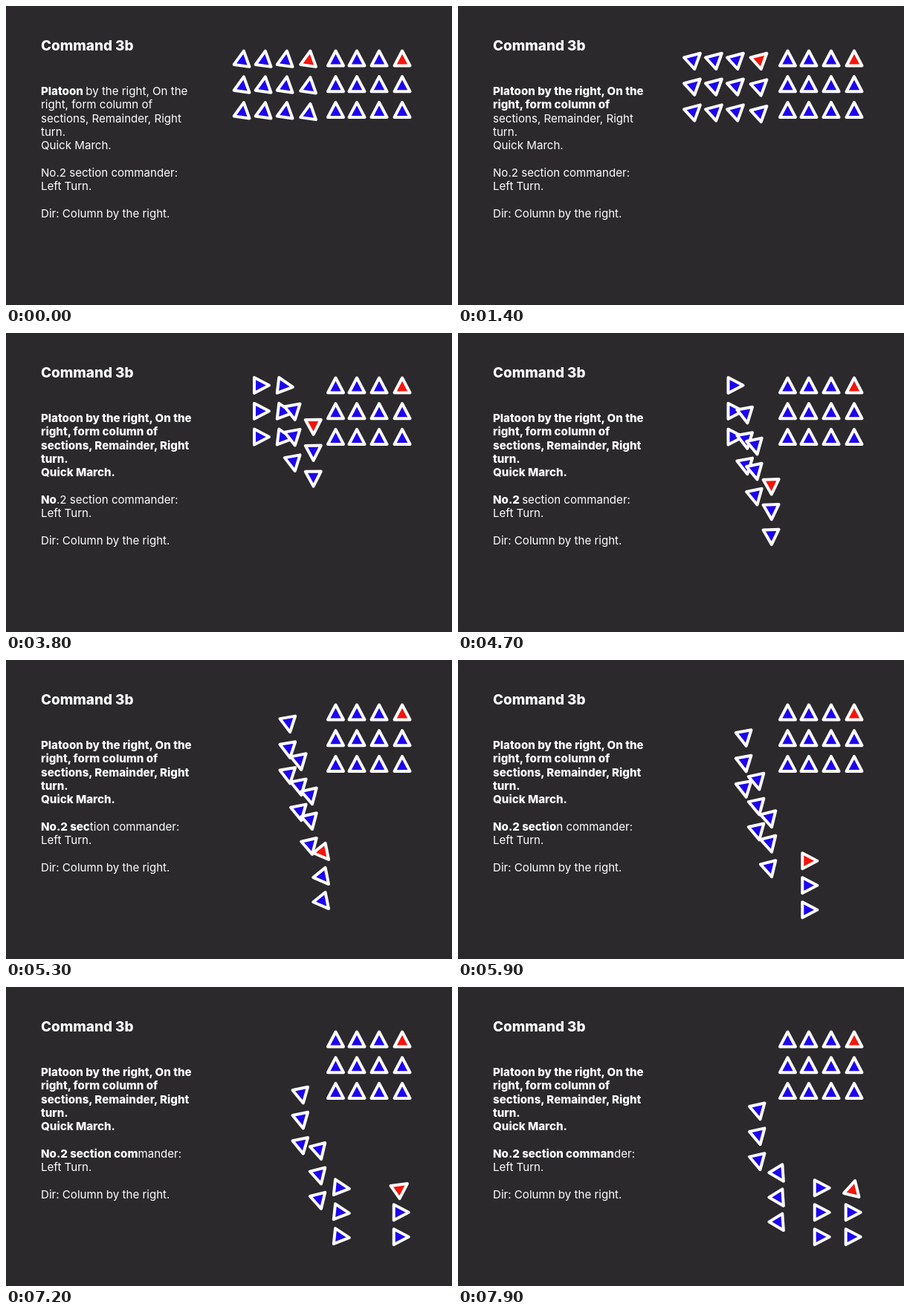
Animation of 600 by 403 pixels, one loop 8 s. Source, as an HTML page:

```html
<!DOCTYPE html>
<html lang="en">
<head>
<meta charset="utf-8">
<title>Command 3b</title>
<style>
  html, body { margin: 0; width: 100%; height: 100%; overflow: hidden; background: #2b292c; }
  svg { display: block; width: 100%; height: 100%; }
  text { font-family: Inter, sans-serif; font-size: 15.1px; fill: #fff; white-space: pre; }
  .bold { font-weight: 800; }
  .title { font-size: 18.9px; }
  path { stroke: #fff; stroke-width: 4; stroke-linejoin: round; }
</style>
</head>
<body>
<svg id="stage" viewBox="0 0 600 403">
  <text class="bold title" x="47" y="59.8">Command 3b</text>
</svg>
<script>
const LOOP = 8000, STEP = 100;
const BLUE = '#1c05ee', RED = '#f4150b';
const TOP = 70.5, BOTTOM = 270.8;
const stage = document.getElementById('stage');

const clamp = v => Math.min(1, Math.max(0, v));
const lerp = (a, b, p) => a + (b - a) * p;
const ramp = (t, t0, t1) => clamp((t - t0) / (t1 - t0));

function add(parent, tag, attrs) {
  const el = document.createElementNS('http://www.w3.org/2000/svg', tag);
  for (const k in attrs) el.setAttribute(k, attrs[k]);
  return parent.appendChild(el);
}

// Script: [row, text]
const order = [
  [0, 'Platoon by the right, On the'],
  [1, 'right, form column of'],
  [2, 'sections, Remainder, Right'],
  [3, 'turn.'],
  [4, 'Quick March.']
].map(addLine);
const reply = [
  [6, 'No.2 section commander:'],
  [7, 'Left Turn.'],
  [9, 'Dir: Column by the right.']
].map(addLine);

function addLine([row, text]) {
  const el = add(stage, 'text', { x: 47, y: 120 + 18.33 * row });
  return { text, said: add(el, 'tspan', { class: 'bold' }), rest: add(el, 'tspan', {}) };
}

function speak(lines, count) {
  for (const { text, said, rest } of lines) {
    const n = Math.max(0, Math.min(text.length, Math.floor(count)));
    said.textContent = text.slice(0, n);
    rest.textContent = text.slice(n);
    count -= text.length + 1;
  }
}

function soldier(fill) {
  return add(stage, 'path', { d: 'M0-10L10.5 10H-10.5Z', fill });
}

function place(el, x, y, angle) {
  el.setAttribute('transform', `translate(${x.toFixed(2)} ${y.toFixed(2)}) rotate(${angle.toFixed(2)})`);
}

// Standing section
[443.5, 472, 502, 533].forEach((x, col) => {
  for (let row = 0; row < 3; row++) {
    place(soldier(col === 3 && row === 0 ? RED : BLUE), x, TOP + 34.7 * row, 0);
  }
});

// Marching files: along the rank to the elbow, down to the corner, then right
const files = [
  { x: 318.5, elbow: 375.6, corner: 439.5, start: 3023, speed: .0328, gap: 34.8, aim: [171, 164] },
  { x: 347.5, elbow: 375.6, corner: 439.5, start: 3170, speed: .0465, gap: 34.8, aim: [171, 164] },
  { x: 376.5, elbow: 376.5, corner: 439.5, start: 3090, speed: .0541, gap: 34.8, aim: [171, 164] },
  { x: 408, elbow: 408, corner: 429, start: 3170, speed: .09, gap: 35.6, aim: [180, 177] }
];
files.forEach((f, i) => {
  f.along = f.elbow - f.x;
  f.down = Math.hypot(f.corner - f.elbow, BOTTOM - TOP);
  f.tElbow = f.start + f.along / f.speed;
  f.men = [0, 1, 2].map(row => soldier(i === 3 && row === 0 ? RED : BLUE));
});

function march(f, t) {
  const dist = Math.max(0, t - f.start) * f.speed;
  const past = dist - f.along - f.down;
  const p = clamp((dist - f.along) / f.down);
  const bend = .91 * p + .09 * p ** 4;
  const x = dist < f.along ? f.x + dist
    : Math.min(531.7, lerp(f.elbow, f.corner, bend) + Math.max(0, past));
  const y = lerp(TOP, BOTTOM, p);
  const gap = lerp(f.gap, 33, p);

  let angle = lerp(8, 90, ramp(t, 50, 2850));
  angle = lerp(angle, lerp(...f.aim, p), ramp(t, f.tElbow, f.tElbow + 300));
  angle = lerp(angle, 90, ramp(past, -28, 16));

  f.men.forEach((man, row) => {
    const leader = f === files[3] && row === 0;
    const turn = leader ? lerp(angle, 0, ramp(t, 6600, 8140)) : angle;
    place(man, x, y + gap * row, turn);
  });
}

function draw(t) {
  speak(order, t < 1400
    ? lerp(8, 50.2, ramp(t, 100, 1400))
    : 50.2 + (t - 1400) * .02735);
  speak(reply, 1.6 + (t - 3700) * .0043);
  files.forEach(f => march(f, t));
}

const begin = performance.now();
function tick() {
  const t = (performance.now() - begin) % LOOP;
  draw(Math.floor(t / STEP) * STEP);
  requestAnimationFrame(tick);
}
tick();
</script>
</body>
</html>
```
